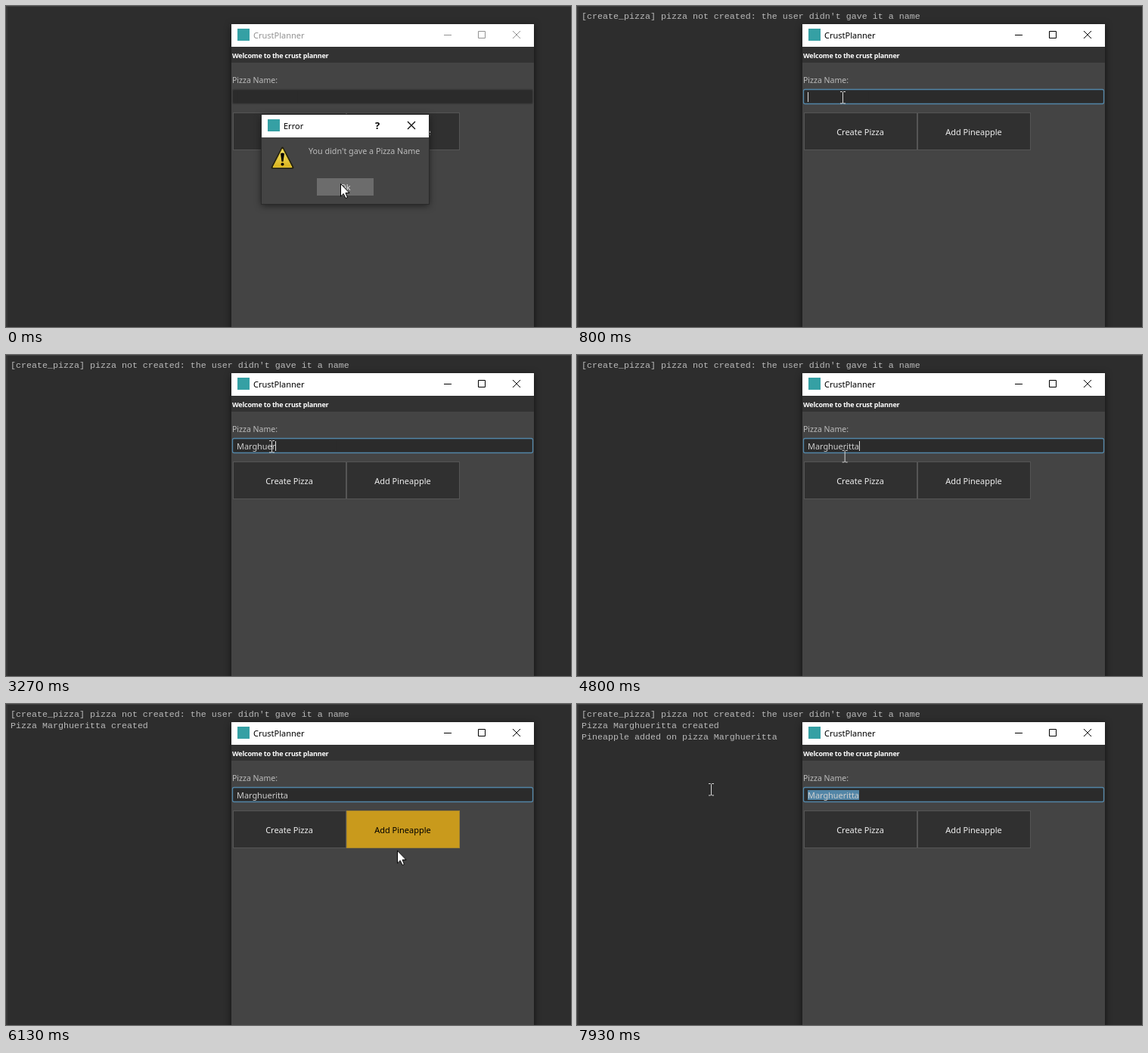
An HTML page for the animation above (8000 ms loop, 747 by 425 pixels).

```html
<!DOCTYPE html>
<html lang="en">
<head>
<meta charset="utf-8">
<title>Crust planner</title>
<style>
  html, body { margin: 0; width: 100%; height: 100%; overflow: hidden; background: #2d2d2d; }
  svg { display: block; width: 747px; height: 425px; }
  text { font: 11px "Noto Sans", "Open Sans", sans-serif; white-space: pre; }
  .log text { font: 11.667px "Liberation Mono", "Courier New", monospace; fill: #b9b9b9; }
  .label { font-size: 10.5px; fill: #bcbcbc; }
  .head { font-size: 9px; font-weight: 700; letter-spacing: -.2px; fill: #fff; }
  .typed { font-size: 10.9px; fill: #cfcfcf; }
  .mid { text-anchor: middle; }
  .win { filter: drop-shadow(0 2px 5px rgba(0, 0, 0, .6)); }
  .ui { fill: none; stroke: currentColor; stroke-width: 1; }
  .btn { fill: #303030; stroke: #555; }

  /* Hard switches: 1% is 80 ms */
  .step { animation: 8s step-end infinite; }
  .dialog { animation-name: dialog; }
  .line1 { animation-name: line1; }
  .line2 { animation-name: line2; }
  .line3 { animation-name: line3; }
  .active { animation-name: active; }
  .focus { animation-name: focus; }
  .create { animation-name: create; }
  .fruit { animation-name: fruit; }
  .fruit-text { animation-name: fruit-text; }
  .typing { animation-name: typing; }
  .blink { animation-name: blink; }
  .select { animation-name: select; transform-box: fill-box; transform-origin: right; }
  .arrow { animation-name: arrow; }
  .beam { animation-name: beam; }
  .pointer { animation: pointer 8s linear infinite; }

  @keyframes dialog { 0% { opacity: 1 } 2.45%, 100% { opacity: 0 } }
  @keyframes line1 { 0% { opacity: 0 } 2.45%, 100% { opacity: 1 } }
  @keyframes line2 { 0% { opacity: 0 } 64.1%, 100% { opacity: 1 } }
  @keyframes line3 { 0% { opacity: 0 } 82.45%, 100% { opacity: 1 } }
  @keyframes active { 0% { color: #929292 } 9.95%, 100% { color: #000 } }
  @keyframes focus { 0% { stroke: #3a3a3a } 9.95%, 100% { stroke: #5285a6 } }
  @keyframes create {
    0% { fill: #303030 } 60.8% { fill: #3c3c3c } 66.2%, 100% { fill: #303030 }
  }
  @keyframes fruit {
    0% { fill: #303030; stroke: #555 }
    64.1% { fill: #c99a1c; stroke: #a5852c }
    76.8% { fill: #d2a427; stroke: #a5852c }
    82.45% { fill: #3c3c3c; stroke: #555 }
    84.7%, 100% { fill: #303030; stroke: #555 }
  }
  @keyframes fruit-text { 0% { fill: #eee } 64.1% { fill: #000 } 82.45%, 100% { fill: #eee } }
  @keyframes typing {
    0% { transform: translateX(305px) }
    20.8% { transform: translateX(315px) }
    23.3% { transform: translateX(321px) }
    27.45% { transform: translateX(325px) }
    29.95% { transform: translateX(332px) }
    34.95% { transform: translateX(339px) }
    36.6% { transform: translateX(346px) }
    39.1% { transform: translateX(352px) }
    40.8% { transform: translateX(356px) }
    47.45% { transform: translateX(359px) }
    49.1% { transform: translateX(363px) }
    51.6% { transform: translateX(367px) }
    54.95%, 100% { transform: translateX(373px) }
  }
  @keyframes blink {
    0%, 16.6%, 61.6%, 75%, 88.3%, 96.6%, 100% { opacity: 0 }
    9.95%, 20.8%, 68.3%, 81.6%, 95% { opacity: 1 }
  }
  @keyframes select {
    0% { transform: scaleX(0) } 96.6% { transform: scaleX(.49) } 97.4%, 100% { transform: scaleX(1) }
  }
  @keyframes arrow { 0%, 60.3% { opacity: 1 } 6.6%, 92.1%, 100% { opacity: 0 } }
  @keyframes beam { 0%, 60.3% { opacity: 0 } 6.6%, 92.1%, 100% { opacity: 1 } }
  @keyframes pointer {
    0%, .9% { transform: translate(442px, 235px) }
    2.5% { transform: translate(436px, 226px) }
    5% { transform: translate(384px, 158px) }
    7.5%, 59.1% { transform: translate(351px, 121px) }
    60.8% { transform: translate(356px, 145px) }
    62.5% { transform: translate(366px, 171px) }
    63.4%, 65% { transform: translate(368px, 173px) }
    67.5% { transform: translate(388px, 215px) }
    69.1%, 70% { transform: translate(396px, 227px) }
    72.5% { transform: translate(440px, 233px) }
    74.1% { transform: translate(480px, 221px) }
    76.6% { transform: translate(517px, 194px) }
    79.1%, 82.5% { transform: translate(521px, 174px) }
    84.1% { transform: translate(518px, 180px) }
    86.6% { transform: translate(487px, 205px) }
    88.4% { transform: translate(445px, 180px) }
    90.9% { transform: translate(390px, 134px) }
    92.5% { transform: translate(386px, 122px) }
    94.1%, 95% { transform: translate(385px, 119px) }
    95.9% { transform: translate(376px, 119px) }
    96.6% { transform: translate(340px, 118px) }
    97.5% { transform: translate(285px, 116px) }
    98.4% { transform: translate(220px, 114px) }
    99.1%, 100% { transform: translate(177px, 113px) }
  }
</style>
</head>
<body>
<svg viewBox="0 0 747 425">
  <defs>
    <linearGradient id="warn" x2="0" y2="1">
      <stop stop-color="#f8ea70"/>
      <stop offset="1" stop-color="#d9b21c"/>
    </linearGradient>
  </defs>

  <!-- Console -->
  <rect width="747" height="425" fill="#2d2d2d"/>
  <path d="M0 .5H747M1 0V425" stroke="#404040"/>
  <g class="log">
    <text class="step line1" x="6" y="17">[create_pizza] pizza not created: the user didn't gave it a name</text>
    <text class="step line2" x="6" y="32">Pizza Marghueritta created</text>
    <text class="step line3" x="6" y="47">Pineapple added on pizza Marghueritta</text>
  </g>

  <!-- Main window -->
  <rect class="win" x="298" y="24" width="400" height="420" fill="#444"/>
  <rect x="298" y="24" width="400" height="30" fill="#fff"/>
  <rect x="298" y="54" width="400" height="21" fill="#323232"/>
  <rect x="306" y="30" width="16" height="16" fill="#35a0a4"/>
  <g class="step active">
    <text x="327" y="43" fill="currentColor">CrustPlanner</text>
    <path class="ui" d="M579 38.5h10M624.5 33.5h9v9h-9zM670 33l10 10m0-10l-10 10"/>
  </g>
  <text class="head" x="299" y="69">Welcome to the crust planner</text>
  <text class="label" x="299" y="102">Pizza Name:</text>

  <!-- Name field: the cover hides letters right of the caret -->
  <rect class="step focus" x="299.5" y="110.5" width="397" height="19" rx="2" fill="#2b2b2b" stroke-width="1.3"/>
  <rect class="step select" x="305" y="114" width="68" height="13" fill="#5285a6"/>
  <text class="typed" x="305" y="125">Marghueritta</text>
  <g class="step typing">
    <rect x=".5" y="113" width="80" height="15" fill="#2b2b2b"/>
    <rect class="step blink" y="114" width="1" height="13" fill="#ddd"/>
  </g>

  <rect class="btn step create" x="300.5" y="141.5" width="149" height="49"/>
  <rect class="btn step fruit" x="450.5" y="141.5" width="149" height="49"/>
  <text class="mid" x="374.5" y="171" font-size="10.7" fill="#eee">Create Pizza</text>
  <text class="mid step fruit-text" x="524.5" y="171">Add Pineapple</text>

  <!-- Error dialog -->
  <g class="step dialog">
    <rect class="win" x="338" y="144" width="221" height="118" fill="#444"/>
    <rect x="338" y="144" width="221" height="30" fill="#fff"/>
    <rect x="337.5" y="143.5" width="222" height="119" fill="none" stroke="#2a2a2a"/>
    <rect x="346" y="150" width="16" height="16" fill="#35a0a4"/>
    <text x="367" y="163">Error</text>
    <text class="mid" x="491" y="163" style="font-size:13px;font-weight:600">?</text>
    <path d="M531 153l10 10m0-10l-10 10" stroke="#000" stroke-width="1.2"/>
    <path d="M365.5 188L379 214H352z" fill="url(#warn)" stroke="#26230f" stroke-width="3" stroke-linejoin="round"/>
    <path d="M365.5 189L378 213.5H353z" fill="url(#warn)" stroke="#e3c536" stroke-linejoin="round"/>
    <path d="M363 195.500q2.500-2 5 0L366.500 206h-2z"/>
    <circle cx="365.500" cy="209.500" r="2"/>
    <text class="label" x="400" y="196" style="font-size:10.75px">You didn't gave a Pizza Name</text>
    <rect x="411" y="228" width="75" height="23" fill="#6c6c6c"/>
    <text class="mid" x="448.500" y="244" fill="#ddd">Ok</text>
  </g>

  <!-- Pointer -->
  <g class="pointer">
    <path class="step arrow" d="M.5.500V17l3.700-3.500L7 19.500l2.500-1L7 12.500h5z" fill="#fff" stroke="#000"/>
    <path class="step beam" d="M-3-7.500h2.500l1 1 1-1H4M.5-6.500V7M-3 8h2.500l1-1 1 1H4" fill="none" stroke="#d8d8d8"/>
  </g>
</svg>
</body>
</html>
```
